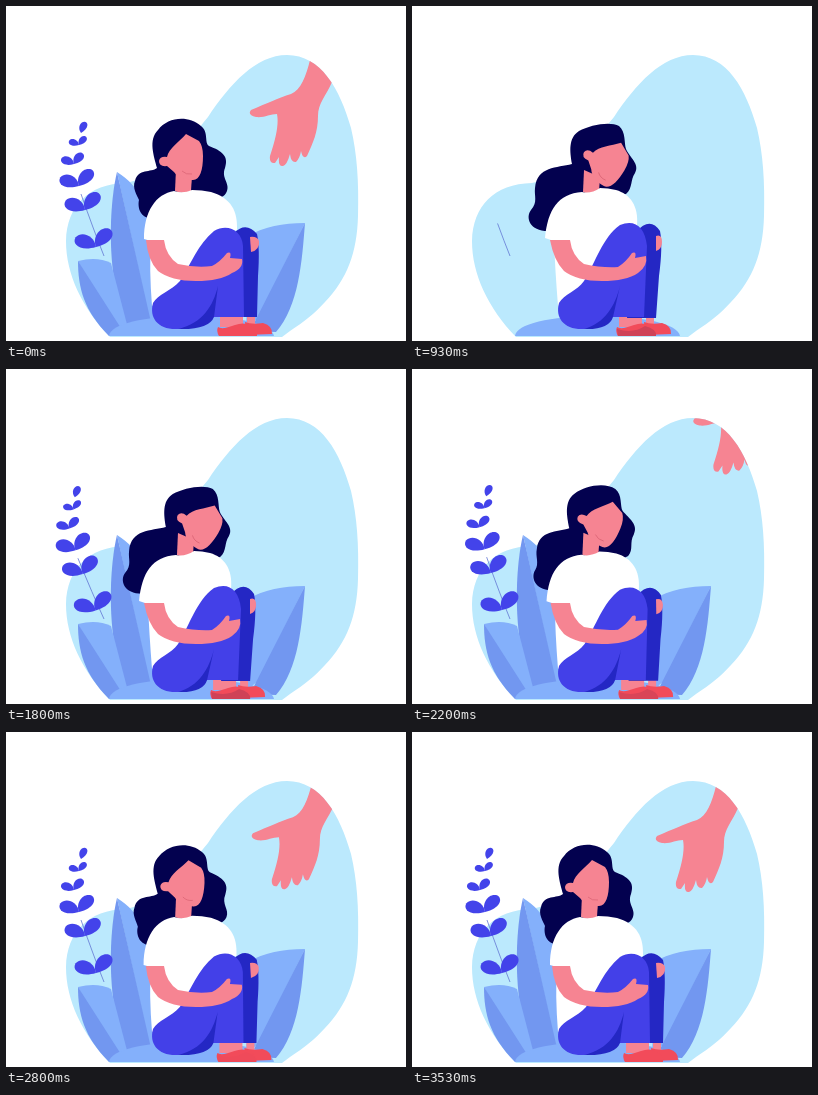
Recreate the animation shown at these times as an HTML page with a canvas. Size 400 by 335 pixels, loop 3.6 s.

```html
<!DOCTYPE html>
<html>
<head>
<meta charset="utf-8">
<style>
  html, body { margin: 0; width: 100%; height: 100%; overflow: hidden; background: #fff; }
  canvas { display: block; }
</style>
</head>
<body>
<canvas id="stage" width="400" height="335"></canvas>
<script>
const ctx = document.getElementById('stage').getContext('2d');
const LOOP = 3600, RESTART = 530;
const C = {
  sky: '#bbe9fd', light: '#84b0fb', dark: '#7297f0', hair: '#03014f', skin: '#f68492',
  crease: '#dc6676', leg: '#4340e8', backLeg: '#2427c4', plant: '#4343ea', shoe: '#f24b5a', shoeLow: '#cf4358'
};

const progress = (t, from, to) => Math.min(1, Math.max(0, (t - from) / (to - from)));
const inOutSine = u => (1 - Math.cos(Math.PI * u)) / 2;
const outBack = u => u <= 0 ? 0 : 1 + 1.9 * (u - 1) ** 3 + 0.9 * (u - 1) ** 2;
const lerp = (a, b, p) => a + (b - a) * p;

// Blend two path strings that share the same commands.
function morph([a, b], p) {
  const ends = b.match(/[\d.]+/g);
  let i = 0;
  return a.replace(/[\d.]+/g, n => lerp(+n, +ends[i++], p).toFixed(2));
}

function fill(d, color) {
  ctx.fillStyle = color;
  ctx.fill(new Path2D(d));
}

function line(d, color, width) {
  ctx.strokeStyle = color;
  ctx.lineWidth = width;
  ctx.stroke(new Path2D(d));
}

function group(draw) {
  ctx.save();
  draw();
  ctx.restore();
}

function around(x, y, scale, angle) {
  ctx.translate(x, y);
  ctx.rotate(angle);
  ctx.scale(scale, scale);
  ctx.translate(-x, -y);
}

const BLOB = 'M104 331C76 302 60 268 60 235C61 200 82 178 120 177C162 168 182 135 202 111C224 78 250 49 281 49C315 49 334 83 345 122C351 148 353 175 352 210C351 247 341 273 319 296C309 307 298 316 284 325L276 331Z';

const HAND = 'M304 54C300 70 295 84 285 88C272 92 262 97 245 104Q241 109 250 111C258 112 264 108 271 108C273 118 270 132 264 150Q263 158 269 157L273 151Q272 161 277 160Q281 159 284 148Q285 157 290 156Q294 152 295 145Q297 154 301 150C307 137 312 126 312 110C312 97 320 90 326 76L355 35L318 10Z';

// Each pair holds the slumped pose and the upright pose.
const BODY = {
  hair: [
    'M160 158C158 146 156 132 167 125C178 119 198 115 207 120C214 126 212 137 214 143C218 152 228 158 223 167C218 174 221 182 214 188C200 192 185 185 175 190C160 200 155 222 138 225C118 226 113 212 119 204C126 196 122 190 123 182C125 160 145 162 160 158Z',
    'M151 162C148 150 142 134 152 124C162 111 182 109 195 120C203 126 198 137 203 140C216 145 223 150 219 162C215 172 224 177 221 185C216 198 200 188 180 195C165 200 160 215 142 212C132 209 132 198 133 194C131 189 126 182 129 175C132 162 145 167 151 162Z'
  ],
  shirt: [
    'M170 186C146 188 136 203 133 232L142 235Q143 262 146 300L185 278L200 232L225 220C227 200 218 188 204 184Q196 182 188 182Q179 188 170 186Z',
    'M168 185C150 188 138 205 138 233L145 235Q143 262 146 300L185 278L205 232L231 224C232 205 225 192 205 186Q196 184 186 184Q177 188 168 185Z'
  ],
  backLeg: [
    'M224 226Q238 210 248 225Q251 240 247 270L244 312L215 312Z',
    'M228 227Q240 215 251 228Q254 242 252 270L251 311L220 311Z'
  ],
  leg: [
    'M147 297C143 312 152 324 172 323C190 322 194 312 200 311L232 311L235 240C233 220 222 213 208 219C190 232 184 256 172 275C165 285 152 288 147 297Z',
    'M147 297C143 312 152 324 172 323C192 322 198 312 207 311L238 311L237 240C236 225 222 217 208 225C192 238 185 258 174 275C165 285 152 288 147 297Z'
  ],
  underLeg: [
    'M208 280C203 300 193 317 172 323Q197 324 201 311Z',
    'M212 280C207 300 197 317 172 323Q203 324 208 311Z'
  ],
  arm: [
    'M138 234L158 234Q160 250 172 258Q190 262 206 261Q214 256 220 247Q225 245 223 252L234 250Q236 260 226 267Q214 275 190 275Q165 275 152 265Q142 255 138 234Z',
    'M140 234L158 234Q160 250 172 258Q190 262 206 260Q214 256 221 247Q226 245 224 252L236 253Q238 262 226 267Q214 275 190 275Q165 275 152 265Q142 255 140 234Z'
  ],
  farHand: [
    'M244 230Q250 228 250 236Q250 243 244 245Z',
    'M244 231Q251 230 253 235Q254 244 245 246Z'
  ]
};
const NECK = 'M170 163L186 170L185 185Q177 189 169 185Z';
const FACE = 'M180 128L193 135Q197 140 197 150C197 164 194 174 187 174C179 174 172 172 168 166L161 160Q153 161 153 155Q154 150 161 151C163 142 173 136 180 128Z';

// Joint x, joint y and size of every leaf pair, bottom to top.
const LEAVES = [[90, 241, 23], [79, 204, 22], [73, 180, 21], [68, 158, 14], [73, 139, 11]];

function leaf(x, y, size, side, tilt) {
  group(() => {
    ctx.translate(x, y);
    ctx.scale(side * size, size);
    ctx.rotate(-tilt);
    fill('M0 0C.2 -.45 .8 -.5 .97 -.14C1.06 .2 .6 .4 0 0Z', C.plant);
  });
}

function drawPlant(t) {
  const sway = inOutSine(progress(t, 1150, 1650)) * (1 - inOutSine(progress(t, 1850, 2300)));
  const grown = i => outBack(progress(t, 960 + i * 120, 1180 + i * 120));
  group(() => {
    around(98, 250, 1, -0.05 * sway);
    ctx.setLineDash([lerp(35, 75, progress(t, 950, 1300)), 99]);
    line('M98 250Q88 225 75 188', '#6478d4', 0.8);
    ctx.setLineDash([]);
    LEAVES.forEach(([x, y, size], i) => {
      leaf(x, y, size * grown(i), -1, 0.3);
      leaf(x, y, size * grown(i), 1, 0.8);
    });
    leaf(75, 127, 12 * grown(LEAVES.length), 1, 1.1);
  });
}

function drawBush(t) {
  const size = outBack(progress(t, 1000, 1700));
  if (!size) return;
  group(() => {
    around(150, 330, size, 0);
    fill('M111 166C136 182 138 198 146 230L150 328L143 311Z', C.light);
    fill('M111 166C104 195 102 245 110 285L122 325L147 325Z', C.dark);
    fill('M72 255Q91 250 105 257L124 330L110 330Z', C.light);
    fill('M72 255C72 282 78 305 103 330L120 330Z', C.dark);
  });
  group(() => {
    around(250, 320, size, 0);
    fill('M299 217Q265 217 244 229L240 322L252 312Z', C.light);
    fill('M299 217C296 255 293 300 270 326L244 325Z', C.dark);
  });
}

function drawWoman(p) {
  const part = (name, color) => fill(morph(BODY[name], p), color);
  const slump = 1 - p;
  part('hair', C.hair);
  group(() => {
    ctx.translate(2 * slump, slump);
    fill(NECK, C.skin);
  });
  part('shirt', '#fff');
  group(() => {
    ctx.translate(3 * slump, slump);
    around(179, 179, 1, 0.54 * slump);
    fill(FACE, C.skin);
    line('M176 165Q180 169 186 168', C.crease, 0.8);
  });
  group(() => {
    ctx.translate(-7 * slump, 0);
    fill('M214 310L237 310L237 321L214 321ZM241 309L249 309L249 319L241 319Z', C.skin);
    fill('M239 316Q246 319 257 317Q267 320 266 328L240 329Z', C.shoe);
    fill('M212 321Q216 324 229 319Q237 316 244 319Q252 323 251 330L213 330Q210 325 212 321Z', C.shoe);
    ctx.globalAlpha = slump;
    fill('M212 323Q228 328 240 320Q252 323 251 330L213 330Z', C.shoeLow);
  });
  part('backLeg', C.backLeg);
  part('farHand', C.skin);
  part('leg', C.leg);
  part('underLeg', C.backLeg);
  part('arm', C.skin);
}

function draw(now) {
  const clock = now % LOOP;
  const t = clock < RESTART ? LOOP : clock;
  const away = 1 - inOutSine(progress(t, 1600, 2950));

  ctx.clearRect(0, 0, 400, 335);
  fill(BLOB, C.sky);
  group(() => {
    ctx.clip(new Path2D(BLOB));
    ctx.translate(64 * away, -93 * away);
    fill(HAND, C.skin);
  });
  group(() => {
    ctx.beginPath();
    ctx.rect(0, 0, 400, 330);
    ctx.clip();
    drawBush(t);
    fill('M103 330C104 318 138 310 185 310C232 310 266 318 268 330Z', C.light);
    drawPlant(t);
    drawWoman(inOutSine(progress(t, 1700, 3050)));
  });
  requestAnimationFrame(draw);
}
requestAnimationFrame(draw);
</script>
</body>
</html>
```
